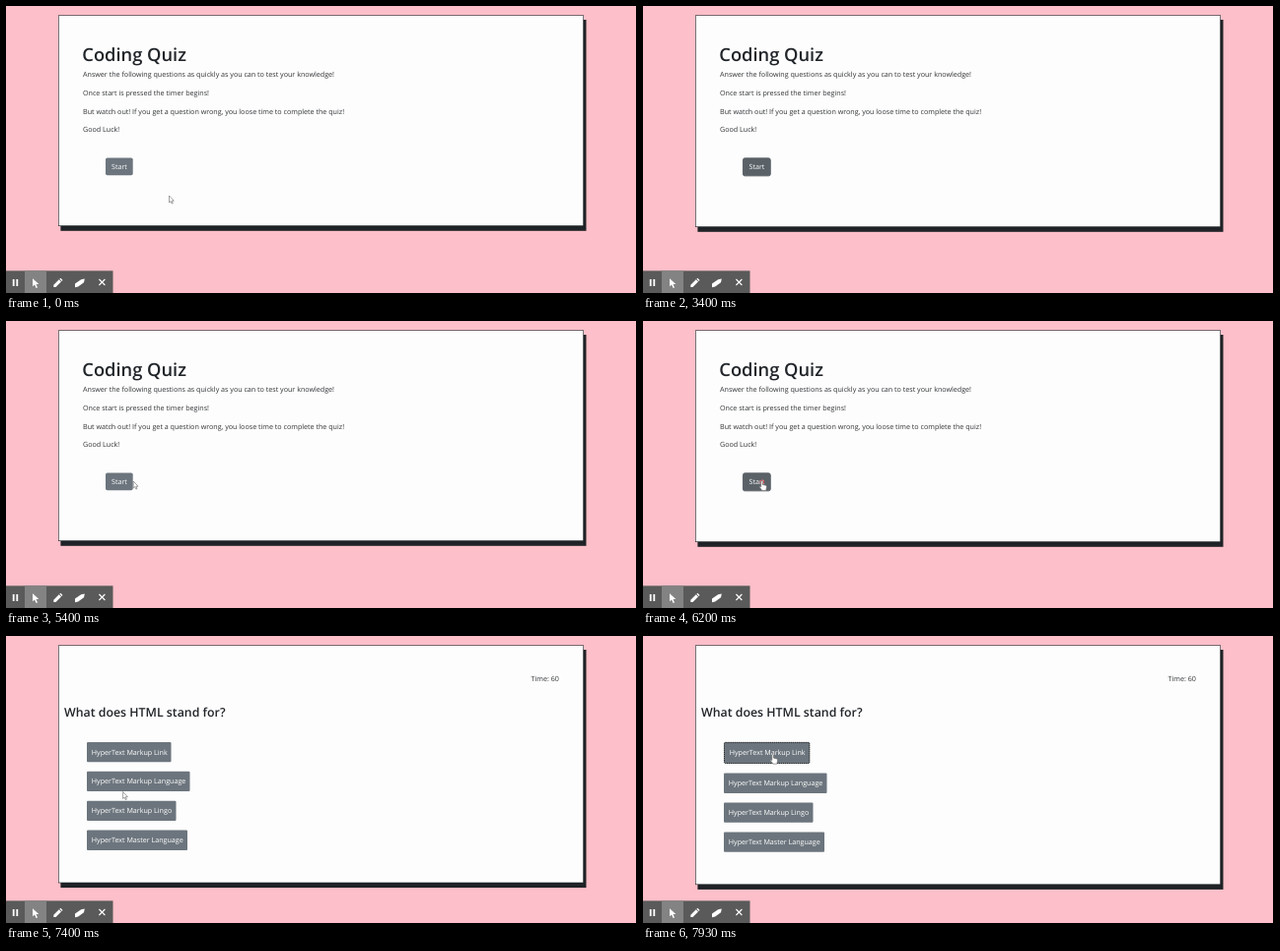
An HTML page for the animation above (8000 ms loop, 640 px wide and 292 px high).

```html
<!DOCTYPE html>
<html lang="en">
<head>
<meta charset="utf-8">
<title>Coding Quiz</title>
<style>
  html, body { margin: 0; width: 100%; height: 100%; overflow: hidden; background: #fdbfc9; }
  svg { display: block; width: 640px; height: 292px; }
  text {
    font: 400 7.15px "Open Sans", "Noto Sans", sans-serif;
    fill: #303336;
    text-rendering: geometricPrecision;
    white-space: pre;
  }
  .title { font-size: 18.3px; font-weight: 600; fill: #212529; }
  .question { font-size: 12.35px; font-weight: 600; fill: #212529; }
  .btn rect { fill: #6c757d; }
  .btn text { fill: #fff; }
  .btn.hot rect { stroke: #14171a; stroke-width: .9; stroke-dasharray: 1.4 .5; }
  #start.hot rect { fill: #5a6268; stroke: #545b62; stroke-dasharray: none; }
  .cursor { fill: #fff; stroke: #666; stroke-width: .6; stroke-linejoin: round; }
  .tools { fill: #fff; }
</style>
</head>
<body>
<svg viewBox="0 0 640 292">
  <rect width="640" height="292" fill="#fdbfc9"/>
  <rect x="639" width="1" height="292"/>
  <rect id="shadow" x="55.4" y="14" width="533.1" fill="#1f2226"/>
  <rect id="card" x="53.3" y="9.7" width="532.4" fill="#fdfdfd" stroke="#212529" stroke-width=".6"/>

  <g id="intro">
    <text class="title" x="77.3" y="56">Coding Quiz</text>
    <text x="78" y="72.4">Answer the following questions as quickly as you can to test your knowledge!</text>
    <text x="78" y="91">Once start is pressed the timer begins!</text>
    <text x="78" y="109.6">But watch out! If you get a question wrong, you loose time to complete the quiz!</text>
    <text x="78" y="128.3">Good Luck!</text>
  </g>

  <g id="quiz">
    <text id="timer" x="532.5" y="45.5">Time: 60</text>
    <text id="question" class="question" x="59" y="73.2">What does HTML stand for?</text>
  </g>

  <circle id="ring" fill="none" stroke="#e0434a" stroke-width=".9"/>
  <path id="arrow" class="cursor" d="M0 0V7L1.6 5.6 2.7 8.1 3.8 7.6 2.7 5.2H4.8Z"/>
  <path id="hand" class="cursor" d="M-.8 .6Q0-.7 .8 .6V3.6L4 4.4Q5 4.7 4.9 6L4.3 9.6H.3L-2.3 6.2Q-2.2 5-.8 6Z"/>

  <g class="tools">
    <rect y="269.4" width="108.5" height="22.6" fill="#5a5a5a"/>
    <rect x="19" y="269.4" width="22" height="22.6" fill="#838383"/>
    <path d="M6.8 278h1.8v7H6.8ZM10.4 278h1.8v7H10.4Z"/>
    <path d="M27 277.2V285.3L29 283.6 30.6 287 32 286.4 30.5 283H33.3Z"/>
    <path d="M48.3 286V283.8L53.8 278.3 56 280.5 50.5 286ZM54.4 277.7L55.4 276.8 57.5 278.9 56.6 279.9Z"/>
    <path d="M70 282.4L76.2 278.2 79.8 277.4 79 281.2 73.2 285.6 70 286.2Z"/>
    <path d="M94.4 278l6 6m0-6l-6 6" stroke="#fff" stroke-width="1.1"/>
  </g>
</svg>
<script>
const LOOP = 8000, STEP = 200 / 3;
const HIDE = 51, SHOW = 66, CLICK = 93, QUIZ = 95, RING_END = 97, TIMER = 110;

// Pointer tip: [step, x, y]
const PATH = [
  [0, 165.5, 193], [6, 147, 187], [12, 147, 187], [20, 109, 165],
  [65, 109, 165], [68, 113, 166], [73, 113, 166], [78, 131.5, 167],
  [81, 129.2, 163], [85, 120.5, 162.8], [109, 120.5, 162.8],
  [111, 118.6, 158.5], [119, 131.6, 120.5]
];

const $ = id => document.getElementById(id);
const set = (el, attrs) => {
  for (const key in attrs) el.setAttribute(key, attrs[key]);
};
const show = (el, on) => { el.style.display = on ? "" : "none"; };

function make(tag, parent) {
  return parent.appendChild(document.createElementNS("http://www.w3.org/2000/svg", tag));
}

function makeButton(parent, label, x, w, h, pad, grow, r) {
  const g = make("g", parent);
  const rect = make("rect", g);
  const text = make("text", g);
  text.textContent = label;
  set(g, { class: "btn" });
  set(rect, { rx: r });
  return { g, rect, text, x, w, h, pad, grow };
}

function placeButton(b, y, hot) {
  const extra = hot ? b.grow : 0, inset = hot ? .45 : 0;
  b.g.classList.toggle("hot", hot);
  set(b.rect, {
    x: b.x + inset, y: y + inset,
    width: b.w + extra - 2 * inset, height: b.h + extra - 2 * inset
  });
  set(b.text, { x: b.x + b.pad + extra / 2, y: y + (b.h + extra) / 2 + 2.5 });
  return extra;
}

const start = makeButton($("intro"), "Start", 101, 27.7, 17.9, 6, 1, 1.8);
start.g.id = "start";

const answers = [
  ["HyperText Markup Link", 85.5],
  ["HyperText Markup Language", 104.5],
  ["HyperText Markup Lingo", 90.5],
  ["HyperText Master Language", 102]
].map(([label, w]) => makeButton($("quiz"), label, 82, w, 20.3, 4.8, 1.8, 1));

function pointerAt(k) {
  const i = Math.max(1, PATH.findIndex(p => p[0] >= k));
  const [k0, x0, y0] = PATH[i - 1], [k1, x1, y1] = PATH[i];
  const u = (k - k0) / (k1 - k0), e = u * u * (3 - 2 * u);
  return [x0 + (x1 - x0) * e, y0 + (y1 - y0) * e];
}

const over = (b, y, [px, py]) =>
  px >= b.x && px <= b.x + b.w && py >= y && py <= y + b.h;

function draw(t) {
  const k = Math.min(119, Math.floor((t + 7) / STEP));
  const tip = pointerAt(k);
  const inQuiz = k >= QUIZ, timed = k >= TIMER;
  let bottom, hot = false;

  if (inQuiz) {
    const shift = timed ? 8.8 : 0;
    let push = 0;
    answers.forEach((b, i) => {
      const y = 99.1 + shift + i * 29.9;
      const on = over(b, y, tip);
      hot = hot || on;
      push += placeButton(b, y + push, on);
    });
    set($("question"), { y: 73.2 + shift });
    bottom = 242.2 + shift + push;
  } else {
    hot = over(start, 154.4, tip);
    bottom = 223.7 + placeButton(start, 154.4, hot);
  }

  show($("intro"), !inQuiz);
  show($("quiz"), inQuiz);
  show($("timer"), timed);
  set($("card"), { height: bottom - 9.7 });
  set($("shadow"), { height: bottom - 8.9 });

  const visible = k < HIDE || k >= SHOW;
  const move = { transform: `translate(${tip[0]} ${tip[1]})` };
  set($("hand"), move);
  set($("arrow"), move);
  show($("hand"), visible && hot);
  show($("arrow"), visible && !hot);

  const ringing = k >= CLICK && k < RING_END;
  show($("ring"), ringing);
  if (ringing) set($("ring"), { cx: tip[0] + .3, cy: tip[1] + 1, r: (k - CLICK + 1) * 1.9 });
}

const begin = performance.now();
function tick() {
  draw((performance.now() - begin) % LOOP);
  requestAnimationFrame(tick);
}
tick();
</script>
</body>
</html>
```
